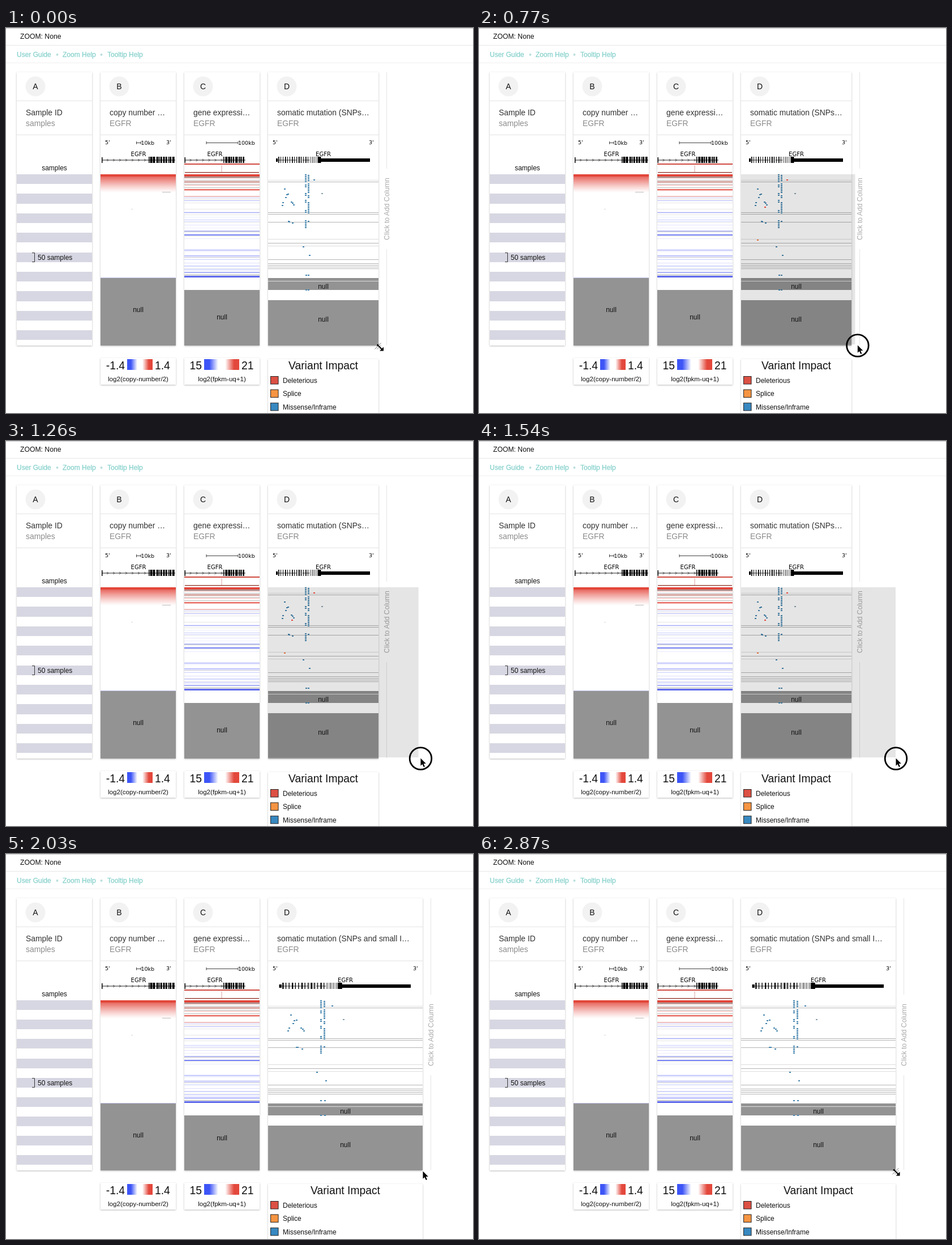
An HTML page that plays this animation: 825x679 px, repeating every 2.94 s.

```html
<!DOCTYPE html>
<html lang="en">
<head>
<meta charset="utf-8">
<title>Resize a column</title>
<style>
html, body { margin: 0; width: 100%; height: 100%; overflow: hidden; background: #fff; }
svg { display: block; width: 825px; height: 679px; font: 12px "Liberation Sans", Arial, sans-serif; }
.card { fill: #fff; filter: drop-shadow(0 1px 1.5px rgba(0,0,0,.27)); }
.axis { font-family: "DejaVu Sans", sans-serif; font-size: 9.5px; }
.crisp { shape-rendering: crispEdges; }
</style>
</head>
<body>
<svg viewBox="0 0 825 679">
  <defs>
    <linearGradient id="scale">
      <stop offset=".15" stop-color="#3d55f6"/><stop offset=".4" stop-color="#fff"/>
      <stop offset=".6" stop-color="#fff"/><stop offset=".85" stop-color="#e3483c"/>
    </linearGradient>
  </defs>
  <g id="page"></g>
  <g id="narrow"></g>
  <g id="wide"></g>
  <g id="drag">
    <rect id="shade" x="463" y="258" height="300" opacity="0.1"/>
    <g id="hits" class="crisp"></g>
  </g>
  <path id="grip" fill="none" stroke="#666" stroke-width=".9" d="M-6 5L5-6M-2 5L5-2M2 5L5 2"/>
  <path id="resize" stroke="#fff" paint-order="stroke"
    d="M-6-6H-2L-3.3-4.7L3.2 1.8L6-1V6H-1L1.8 3.2L-4.7-3.3L-6-2Z"/>
  <path id="arrow" stroke="#fff" stroke-width="1.6" paint-order="stroke"
    d="M0 0V13.2L3 10.4L5.4 15.6L7.5 14.7L5.2 9.6H9.4Z"/>
  <circle id="ring" fill="none" stroke="#000" stroke-width="2.8"/>
</svg>
<script>
const LOOP = 2940, STEP = 70, TOP = 258;
const RED = '#e2453a', BLUE = '#3f4df0', NULL = '#939393', DOT = '#4585ad';
const $ = id => document.getElementById(id);

const rect = (x, y, w, h, fill, more = '') =>
  `<rect x="${x}" y="${y}" width="${w}" height="${h}" fill="${fill}" ${more}/>`;
const line = (x1, y1, x2, y2, color = '#e4e4e4') =>
  `<path d="M${x1} ${y1}L${x2} ${y2}" stroke="${color}"/>`;
const text = (x, y, s, size = 12, fill = '#111', anchor = 'start', more = '') =>
  `<text x="${x}" y="${y}" font-size="${size}" fill="${fill}" text-anchor="${anchor}" ${more}>${s}</text>`;
const mid = (x, y, s, size, fill) => text(x, y, s, size, fill, 'middle');
const axis = (x, y, s, more = '') => `<text class="axis" x="${x}" y="${y}" ${more}>${s}</text>`;
const gene = x => axis(x, 225.5, 'EGFR', 'text-anchor="middle" style="font-size:10px"');
const repeat = (n, f) => Array.from({ length: n }, (_, i) => f(i)).join('');

function random(seed) {
  return () => (seed = (seed * 16807) % 2147483647) / 2147483647;
}

function column(x, w, h, letter, title, sub) {
  return rect(x, 78, w, TOP - 78 + h, '#fff', 'class="card"') +
    `<circle cx="${x + 33}" cy="103" r="17.5" fill="#f2f2f2"/>` +
    mid(x + 33, 108, letter, 14) +
    text(x + 16, 154, title, 13.9, '#333') + text(x + 16, 173, sub, 13.9, '#8c8c8c') +
    line(x, 128.5, x + w, 128.5) + line(x, 188.5, x + w, 188.5);
}

function scaleBar(x1, x2, label) {
  return line(x1, 202.5, x2, 202.5, '#444') + line(x1, 200, x1, 205, '#444') +
    line(x2, 200, x2, 205, '#444') + axis(x2, 206, label);
}

// Intron with direction marks, then exons of varied width up to the end.
function transcript(x1, exonStart, x2, seed) {
  const rnd = random(seed);
  let s = line(x1, 233, x2, 233, '#222') + rect(x1, 228, 1.5, 10, '#000');
  for (let x = x1 + 9; x < exonStart - 4; x += 11)
    s += `<path d="M${x} 231l3 2l-3 2" fill="none" stroke="#333" stroke-width=".8"/>`;
  for (let x = exonStart, w; x < x2 - 2; x += w + 0.8 + rnd() * 1.6) {
    w = 1.5 + rnd() * 3;
    s += rect(x, 227, Math.min(w, x2 - x), 11, '#000');
  }
  return s;
}

function sampleBands() {
  return repeat(9, i => rect(19, TOP + i * 34.4, 133, 17.2, '#d7d7e3'));
}

function copyNumber() {
  const fade = i => i < 4 ? 1 : 0.8 * (1 - (i - 4) / 28) ** 1.25;
  return repeat(32, i => rect(167, TOP + i, 133, 1, RED, `opacity="${fade(i).toFixed(2)}"`)) +
    rect(276, 289, 15, 1, '#bbb') + rect(222, 319, 1, 1, '#999') +
    rect(167, 440, 133, 1, '#c3c3ee') + rect(167, 441, 133, 119, NULL);
}

// Sorted from high to low: red fades out, blue fades in, grey throughout.
function expression() {
  const rnd = random(77);
  const row = (y, h, c, o = 1) => rect(315, y, 133, h, c, `opacity="${o.toFixed(2)}"`);
  let s = row(TOP, 4, RED);
  for (let y = 262; y < 440; y++) {
    const f = (y - 262) / 178, hit = rnd(), tone = rnd(), power = rnd();
    if (hit > 0.72 - 0.35 * Math.min(1, f * 4)) continue;
    const color = tone < 0.25 ? '#777' : f < 0.2 ? RED : BLUE;
    s += row(y, 1, color, f < 0.2 ? 0.6 - 2 * f + power * 0.15 : 0.1 + power * power * (0.25 + 0.4 * f));
  }
  return s + row(284, 2, RED, 0.7) + row(364, 2, BLUE, 0.7) + row(437, 3, BLUE, 0.8) + row(462, 98, NULL);
}

const spot = (x, y, color = DOT) => rect(x - 1.5, y - 1, 3, 2, color);

function mutations(w) {
  const k = w / 195, X = x => 463 + (x - 463) * k, rnd = random(31);
  const row = (y, c, h = 1) => rect(463, y, w, h, c);
  let s = [268, 372, 384].map(y => row(y, '#ddd')).join('') +
    [271, 325, 328, 342, 379, 408].map(y => row(y, '#b4b4b4')).join('') +
    repeat(4, i => row(415 + i * 3, '#b4b4b4')) +
    row(441, '#888') + row(442, NULL, 20) + row(446, '#ddd') + row(480, NULL, 80);
  // Two hot spots that thin out downwards, plus scattered hits to their left.
  for (let y = 259; y < 366; y += 3) {
    const chance = 0.9 - (y - 259) / 140;
    if (rnd() < chance) s += spot(X(529.5), y);
    if (rnd() < chance) s += spot(X(534), y + 1);
  }
  s += repeat(12, () => spot(X(484 + rnd() * 25), 264 + rnd() * 88));
  s += [436, 462].map(y => spot(X(530), y) + spot(X(534.5), y)).join('');
  return s + spot(X(544), 268) + spot(X(558), 292, '#8aa0ad') + spot(X(525), 386) + spot(X(536), 401);
}

function mutationGene(w) {
  const k = w / 195;
  const box = (x, dx, y, h, c = '#000') => rect(463 + (x - 463) * k, y, dx * k, h, c);
  return box(477, 74, 232.5, 1, '#444') + box(477, 3, 230, 6) +
    box(513, 11, 227, 11, '#d2d2d2') + box(536, 15, 227, 11, '#d2d2d2') +
    repeat(18, i => box(481 + i * 4, i % 3 ? 1 : 1.7, 227, 11, i > 13 ? '#888' : '#000')) +
    box(551, 5.5, 227, 11) + box(556, 87, 230, 6);
}

function legend(x, low, high, caption, left, right) {
  return rect(x, 582, 133, 47, '#fff', 'class="card"') +
    text(left - 4, 602, low, 19.3, '#111', 'end') + text(right + 4, 602, high, 19.3) +
    rect(left, 584, right - left, 19, 'url(#scale)') + mid(x + 66.5, 623, caption, 11.6);
}

function impactLegend(w) {
  const items = [['Deleterious', '#dc5044'], ['Splice', '#f59543'], ['Missense/Inframe', '#3788c0']];
  return rect(463, 584, w, 120, '#fff', 'class="card"') +
    mid(463 + w / 2, 601.5, 'Variant Impact', 19.3) +
    items.map(([name, color], i) => {
      const y = 614.5 + i * 23.4;
      return rect(467.5, y, 13.5, 13.5, color, 'stroke="#222"') + text(489, y + 11.2, name);
    }).join('');
}

function scene(w, h, title, nulls) {
  const k = h / 302, Y = y => TOP + (y - TOP) * k, add = 463 + w + 14.5, center = 463 + w / 2;
  const nullX = [233.5, 381.5, center, center];
  return column(19, 133, h, 'A', 'Sample ID', 'samples') +
    column(167, 133, h, 'B', 'copy number …', 'EGFR') +
    column(315, 133, h, 'C', 'gene expressi…', 'EGFR') +
    column(463, w, h, 'D', title, 'EGFR') +
    `<g class="crisp" transform="translate(0 ${TOP * (1 - k)}) scale(1 ${k})">` +
    sampleBands() + copyNumber() + expression() + mutations(w) + '</g>' +
    mid(85.5, 251, 'samples') + text(56, Y(409), '50 samples') +
    `<path d="M46 ${Y(396.5)}h4.5V${Y(412.5)}h-4.5" fill="none" stroke="#333"/>` +
    axis(175, 205, "5'") + scaleBar(230.5, 238.5, '10kb') + axis(283, 205, "3'") +
    gene(234) + transcript(169, 252, 299, 9) +
    scaleBar(354, 410, '100kb') + gene(369) + transcript(315.5, 384, 423, 5) +
    rect(315, 239, 133, 2, '#cf4a40') + line(381, 242, 381, 254, '#d8a09d') + rect(316, 254, 131, 1.5, '#9c4741') +
    axis(471, 205, "5'") + axis(463 + w - 17, 205, "3'") + gene(center) + mutationGene(w) +
    nulls.map((y, i) => mid(nullX[i], y, 'null')).join('') +
    line(add, 78, add, 248) + line(add, 390, add, TOP + h - 1) +
    text(0, 0, 'Click to Add Column', 12.2, '#aaa', 'middle', `transform="translate(${add + 4} 319) rotate(-90)"`) +
    `<g transform="translate(0 ${h - 302})">` +
    legend(167, '-1.4', '1.4', 'log2(copy-number/2)', 214, 259) +
    legend(315, '15', '21', 'log2(fpkm-uq+1)', 350, 412) + impactLegend(w) + '</g>';
}

function page() {
  const teal = '#84d0cb', link = (x, s) => text(x, 50.5, s, 12, teal, 'start', `stroke="${teal}" stroke-width=".25"`);
  return line(0, 0.5, 825, 0.5, '#c9c9c9') + line(0, 30.5, 825, 30.5, '#e6e6e6') + line(0, 61.5, 825, 61.5, '#eee') +
    text(25, 18.5, 'ZOOM: None', 12.2) +
    link(19, 'User Guide') + link(100, 'Zoom Help') + link(179, 'Tooltip Help') +
    [90.5, 168.5].map(x => `<circle cx="${x}" cy="47" r="2" fill="#b9dfdd"/>`).join('');
}

$('page').innerHTML = page();
$('narrow').innerHTML = scene(195, 302, 'somatic mutation (SNPs…', [501, 514, 518, 460]);
$('wide').innerHTML = scene(273, 300, 'somatic mutation (SNPs and small I…', [500, 505, 516.5, 458]);
$('hits').innerHTML = spot(544, 268, RED) + spot(505, 316, RED) + spot(492, 374, '#e2703a');

const show = (id, on) => $(id).setAttribute('visibility', on ? 'visible' : 'hidden');
const move = (id, x, y) => $(id).setAttribute('transform', `translate(${x} ${y})`);

// Pointer travel from the old column edge to the new one.
function travel(t) {
  const u = Math.min(1, Math.max(0, (t - 593) / 773));
  return u * u * (3 - 2 * u);
}

function draw(t) {
  const wide = t >= 2030, dragging = t >= 700 && !wide;
  const hover = t < 700 || t >= 2450, pressed = t >= 630 && t < 1750;
  const x = 658.5 + 78 * travel(t), y = dragging ? 560 : 562.5;

  show('narrow', !wide);
  show('wide', wide);
  show('drag', dragging);
  $('shade').setAttribute('width', 195 + 78 * travel(t - 40));

  show('grip', hover);
  show('resize', hover);
  show('arrow', !hover);
  move('grip', wide ? 736.5 : 657.5, wide ? 560 : 561.5);
  move('resize', wide ? 737.5 : 661, wide ? 561.5 : 563.5);
  move('arrow', x, 559.5);

  show('ring', pressed);
  $('ring').setAttribute('r', t < 700 ? 16.8 : 19.3);
  move('ring', x, y);
}

function tick() {
  const t = performance.now() % LOOP;
  draw(Math.floor(t / STEP) * STEP);
  requestAnimationFrame(tick);
}
tick();
</script>
</body>
</html>
```
